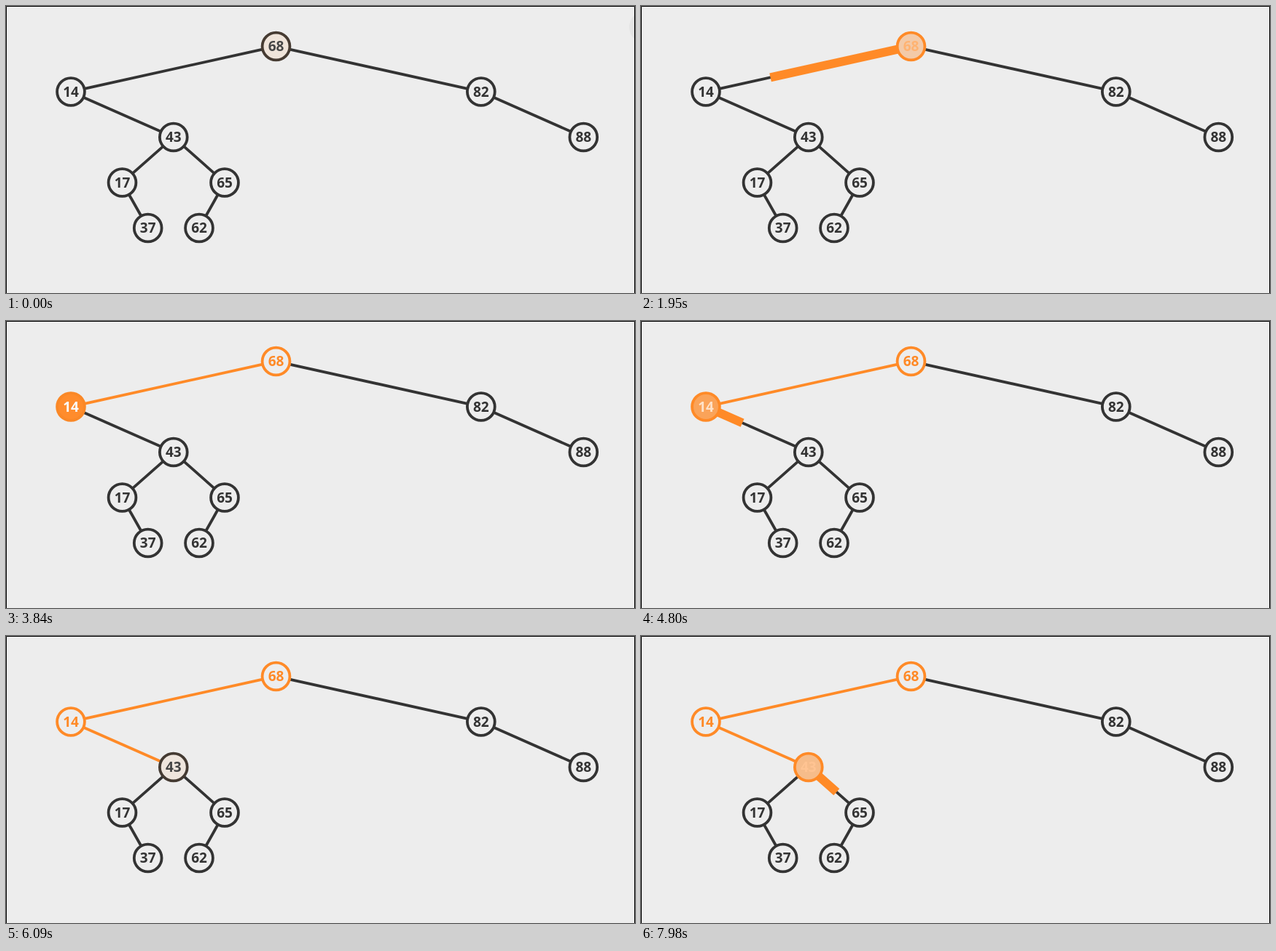
Animation, 863 px wide and 395 px high, one loop 8 s. Source, as an HTML page:

```html
<!DOCTYPE html>
<html lang="en">
<head>
<meta charset="utf-8">
<title>Binary search tree walk</title>
<style>
  html, body { margin: 0; width: 100%; height: 100%; overflow: hidden; background: #ededed; }
  svg { display: block; width: 863px; height: 395px; }
  line { stroke: #333; stroke-width: 3.8; }
  .trail { stroke: #ff8a27; stroke-width: 12; }
  circle { fill: #ededed; stroke: #333; stroke-width: 3.8; }
  text { font: 600 19px "Noto Sans", "Open Sans", sans-serif; fill: #333; text-anchor: middle; }
  .frame { fill: none; stroke: #000; }
  .hint { fill: #e5e5e5; stroke: none; animation: fade 8s linear infinite; }
  @keyframes fade { 0% { opacity: 1; } 2.5%, 100% { opacity: 0; } }
</style>
</head>
<body>
<svg viewBox="0 0 863 395">
  <circle class="hint" cx="877" cy="29" r="22"/>
  <g id="edges"></g>
  <g id="trails"></g>
  <g id="nodes"></g>
  <path class="frame" d="M.5 395V.5H862.5V395"/>
</svg>
<script>
const LOOP = 8000, DURATION = 1430, LEAD = 1525, LAG = 40, RADIUS = 18.9;
const DARK = [51, 51, 51], PAPER = [237, 237, 237], WHITE = [255, 255, 255], ORANGE = [255, 138, 39];

const places = {
  68: [370.5, 55.5], 14: [89, 118], 82: [651.8, 118],
  43: [229.8, 180.5], 88: [792.3, 180.5], 17: [159.5, 243],
  65: [300, 243], 37: [194.7, 305.5], 62: [265, 305.5]
};
const links = [[68, 14], [68, 82], [14, 43], [82, 88], [43, 17], [43, 65], [17, 37], [65, 62]];

// Each step fills a node, then sends a trail down the edge to the next one.
const steps = [
  { from: 68, to: 14, start: 1115 },
  { from: 14, to: 43, start: 4192 },
  { from: 43, to: 65, start: 7225 }
];

function add(parent, tag, attrs) {
  const el = document.createElementNS("http://www.w3.org/2000/svg", tag);
  for (const key in attrs) el.setAttribute(key, attrs[key]);
  return document.getElementById(parent).appendChild(el);
}

// Both ends of an edge, trimmed to the circles.
function span(a, b) {
  const [ax, ay] = places[a], [bx, by] = places[b];
  const k = RADIUS / Math.hypot(bx - ax, by - ay);
  const dx = (bx - ax) * k, dy = (by - ay) * k;
  return { x1: ax + dx, y1: ay + dy, x2: bx - dx, y2: by - dy };
}

const edges = {}, nodes = {};
for (const [a, b] of links) edges[a + "-" + b] = add("edges", "line", span(a, b));
for (const [key, [x, y]] of Object.entries(places)) {
  const disc = add("nodes", "circle", { cx: x, cy: y, r: RADIUS });
  const label = add("nodes", "text", { x, y: y + 6.6 });
  label.textContent = key;
  nodes[key] = { disc, label };
}
for (const step of steps) {
  step.line = span(step.from, step.to);
  step.trail = add("trails", "line", { ...step.line, class: "trail" });
}

function ease(t, start) {
  const p = Math.min(1, Math.max(0, (t - start) / DURATION));
  return p < 0.5 ? 4 * p ** 3 : 1 - 4 * (1 - p) ** 3;
}

const lerp = (a, b, p) => a + (b - a) * p;
const mix = (a, b, p) => `rgb(${a.map((v, i) => Math.round(lerp(v, b[i], p)))})`;

function draw(t) {
  for (const { from, to, start, line, trail } of steps) {
    const fill = ease(t, start - LEAD), clear = ease(t, start + LAG);
    const { disc, label } = nodes[from];
    disc.style.stroke = mix(DARK, ORANGE, fill);
    disc.style.fill = clear ? mix(ORANGE, PAPER, clear) : mix(PAPER, ORANGE, fill);
    label.style.fill = clear ? mix(WHITE, ORANGE, clear) : mix(DARK, WHITE, fill);

    const grow = ease(t, start), done = t >= start + DURATION;
    trail.style.display = grow > 0 && !done ? "" : "none";
    trail.setAttribute("x2", lerp(line.x1, line.x2, grow));
    trail.setAttribute("y2", lerp(line.y1, line.y2, grow));
    edges[from + "-" + to].style.stroke = done ? mix(ORANGE, ORANGE, 1) : "";
  }
}

const origin = performance.now();
function tick() {
  draw((performance.now() - origin) % LOOP);
  requestAnimationFrame(tick);
}
tick();
</script>
</body>
</html>
```
